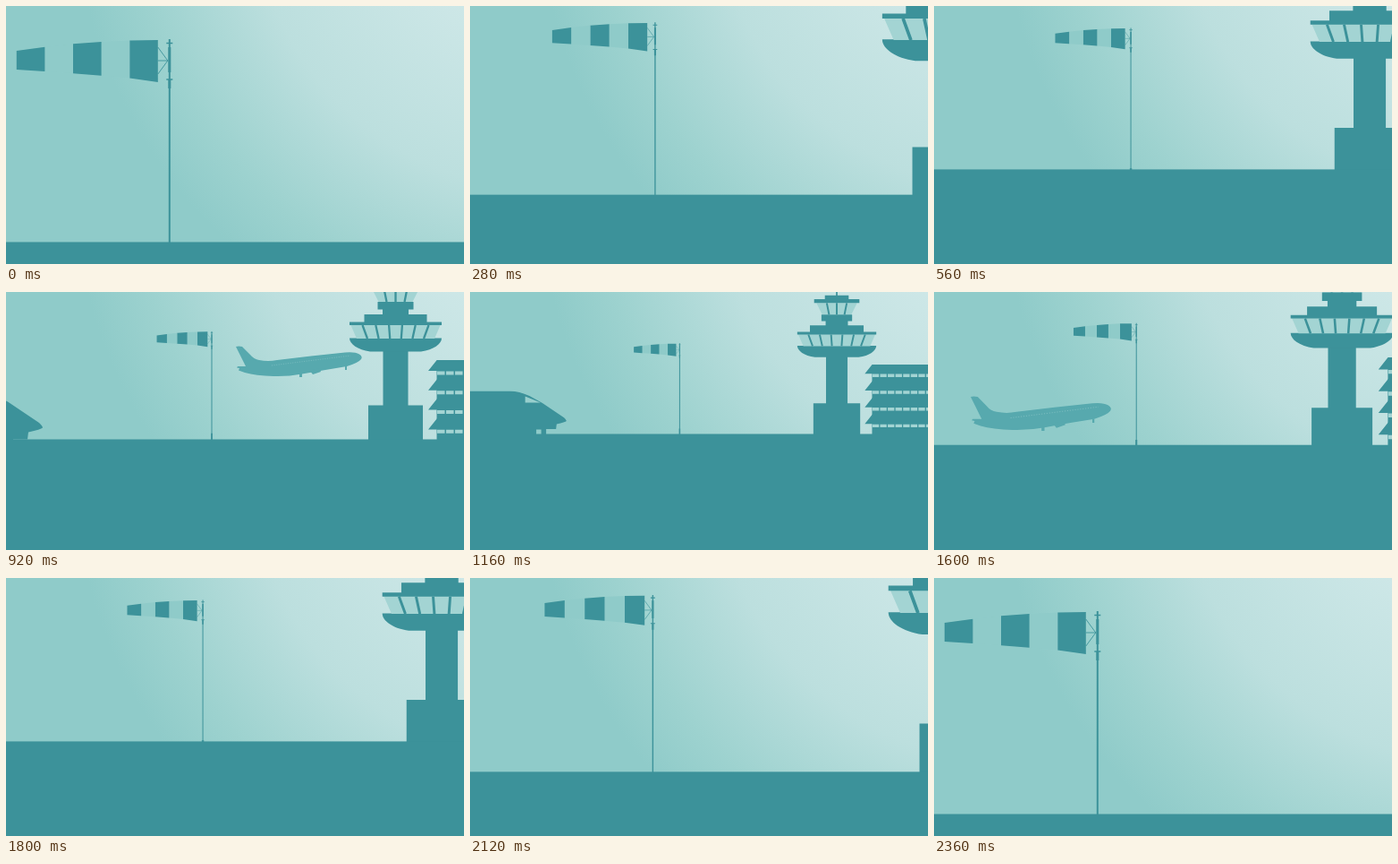
An HTML page for the animation above (2400 ms loop, 512 px wide and 288 px high).

```html
<!DOCTYPE html>
<html lang="en">
<head>
<meta charset="utf-8">
<title>Airfield</title>
<style>
html, body { margin: 0; width: 100%; height: 100%; overflow: hidden; background: #3c929a; }
svg { display: block; width: 100vw; height: 100vh; }
</style>
</head>
<body>
<svg viewBox="0 0 512 288">
  <defs>
    <radialGradient id="sky" gradientUnits="userSpaceOnUse" cx="610" cy="-130" r="535">
      <stop offset=".3" stop-color="#cde7e7"/>
      <stop offset=".63" stop-color="#bcdfde"/>
      <stop offset=".87" stop-color="#9dd2cf"/>
      <stop offset="1" stop-color="#8fcbc9"/>
    </radialGradient>
  </defs>
  <rect width="512" height="288" fill="url(#sky)"/>

  <!-- plane, anchored at the tip of its fin -->
  <g id="plane" fill="#57a9ae">
    <path d="M0 1Q3 0 7 1L16 10Q20 15 26 16Q36 18 46 16L84 11.500L122 7.500Q133 6.500 138 9.500Q142 12 140 15Q137 19 124 23L100 27L74 31.500Q58 34.500 42 34Q22 33.500 10 30L3 27.500L4 25L1 24.500L2 23L11 23Z"/>
    <path d="M71 31h3v4h-3zM122 23h2v4h-2zM82 27l11-2 2 4-9 3z"/>
    <path d="M40 22L128 11" fill="none" stroke="#80c0c3" stroke-width=".8" stroke-dasharray="1 1.600"/>
  </g>

  <g id="port" fill="#3c929a">
    <!-- tower -->
    <path d="M405 126.500H466V220H405ZM421.500 60H449.500V130H421.500Z"/>
    <path d="M384 51.500C384 58 393 64.500 407 66.500H464C478 64.500 487 58 487 51.500Z"/>
    <path d="M385 36H486L479 52H392ZM409 -4H462L454.500 11H416.500Z" fill="#a3d4d3"/>
    <path d="M384 33.500H487V37H384ZM400.500 25H470.500V34H400.500ZM421 18H450V26H421ZM415.500 11H455.500V19.500H415.500Z"/>
    <path d="M406 -9H465V-4H406ZM420 -14H451V-8H420ZM434.500 -30H436.500V-12H434.500Z"/>
    <path id="bars" fill="none" stroke="#3c929a" stroke-width="2.300"/>
    <!-- terminal -->
    <path d="M481.500 80H640V220H481.500Z"/>
    <path id="slats"/>
    <path id="panes" fill="none" stroke="#a3d4d3" stroke-width="4" stroke-dasharray="8.500 1.500"/>
  </g>

  <g id="sock">
    <g id="stripes"></g>
    <g fill="none" stroke="#3c929a">
      <path id="mast" d="M0 0V400"/>
      <path d="M-13 9L-2 24L-13 39M-13 24H-2" stroke-width=".9"/>
      <path d="M0 9V37M0 45V55" stroke-width="3"/>
      <path d="M-3.500 4.500H3.500M-3.500 45H3.500" stroke-width="1.600"/>
      <path d="M0 317V400" stroke-width="5"/>
    </g>
  </g>

  <g id="nose" fill="#3c929a">
    <path d="M-330 -61H-50Q-36 -61 -19 -53.500L2 -42L37 -18.500Q41 -15 41 -13Q39 -11 25 -8L24 0H8V12H0V1H-8V12H-330Z"/>
    <path d="M-26 -53L-1 -42.500H-26Z" fill="#98cfcd"/>
  </g>
  <rect id="ground" width="512" height="300" fill="#3c929a"/>
</svg>
<script>
const $ = id => document.getElementById(id);
const STEP = 40, HALF = 30, CX = 256.5;

// Sock narrows from the hoop (u = 0) to the tail (u = 1)
const rib = u => ({ x: -13 - 158 * u, top: 1 + 12 * u * u, low: 48 - 14 * u ** .7 });
for (let i = 0; i < 5; i++) {
  const a = rib(i / 5), b = rib((i + 1) / 5);
  $("stripes").innerHTML += `<path fill="${i % 2 ? "#8fcbc9" : "#3c929a"}"
    d="M${a.x} ${a.top}L${b.x} ${b.top}V${b.low}L${a.x} ${a.low}Z"/>`;
}

// Leaning window bars, spread evenly about the tower axis
function windowBars(count, wide, narrow, y1, y2) {
  let d = "";
  for (let i = 0; i < count; i++) {
    const n = i - (count - 1) / 2;
    d += `M${435.5 + n * wide} ${y1}L${435.5 + n * narrow} ${y2}`;
  }
  return d;
}
$("bars").setAttribute("d", windowBars(6, 14.8, 12.6, 37, 52) + windowBars(3, 13, 10, -4, 11));

let slats = "", panes = "";
for (let i = 0; i < 4; i++) {
  const y = 88 + 21.8 * i, h = i ? 16 : 12;
  slats += `M472 ${y}L${472 + h * .8} ${y - h}H640V${y}Z`;
  panes += `M482 ${y + 2.4}H640`;
}
$("slats").setAttribute("d", slats);
$("panes").setAttribute("d", panes);

// Height of a layer that settles as the camera pulls back
const settle = (end, drop, rate, f) => end + drop * Math.exp(-rate * f);

function place(id, x, y, s, tail = "") {
  $(id).setAttribute("transform", `translate(${x} ${y}) scale(${s}) ${tail}`);
}

function draw(ms) {
  // Forward for one half of the loop, then back again
  const n = Math.floor(ms / STEP) % (2 * HALF);
  const f = Math.min(n, 2 * HALF - 1 - n);

  $("ground").setAttribute("y", settle(150, 113.5, .0895, f));

  const k = 1 / (1 + .066 * f + .0005 * f * f);
  place("sock", CX - 73.7 * k, settle(152.5, 221.5, .1248, f) - 337 * k, k);
  $("mast").setAttribute("stroke-width", Math.max(2, 1 / k));

  const q = 1 / (.49 + .0178 * f + .00019 * f * f);
  place("port", CX, settle(122.5, 90.2, .1355, f), q, `translate(${-CX} -126.500)`);

  const fly = f - 23;
  place("plane", 257 + 54 * fly, 60 - 14 * fly, q);
  $("plane").style.display = f > 15 ? "" : "none";

  place("nose", CX, settle(145, 19.5, .15, fly), 1 / (1 + .075 * fly), `translate(${-CX} 0)`);
  $("nose").style.display = f > 19 ? "" : "none";
}

function tick() {
  draw(performance.now());
  requestAnimationFrame(tick);
}
tick();
</script>
</body>
</html>
```
